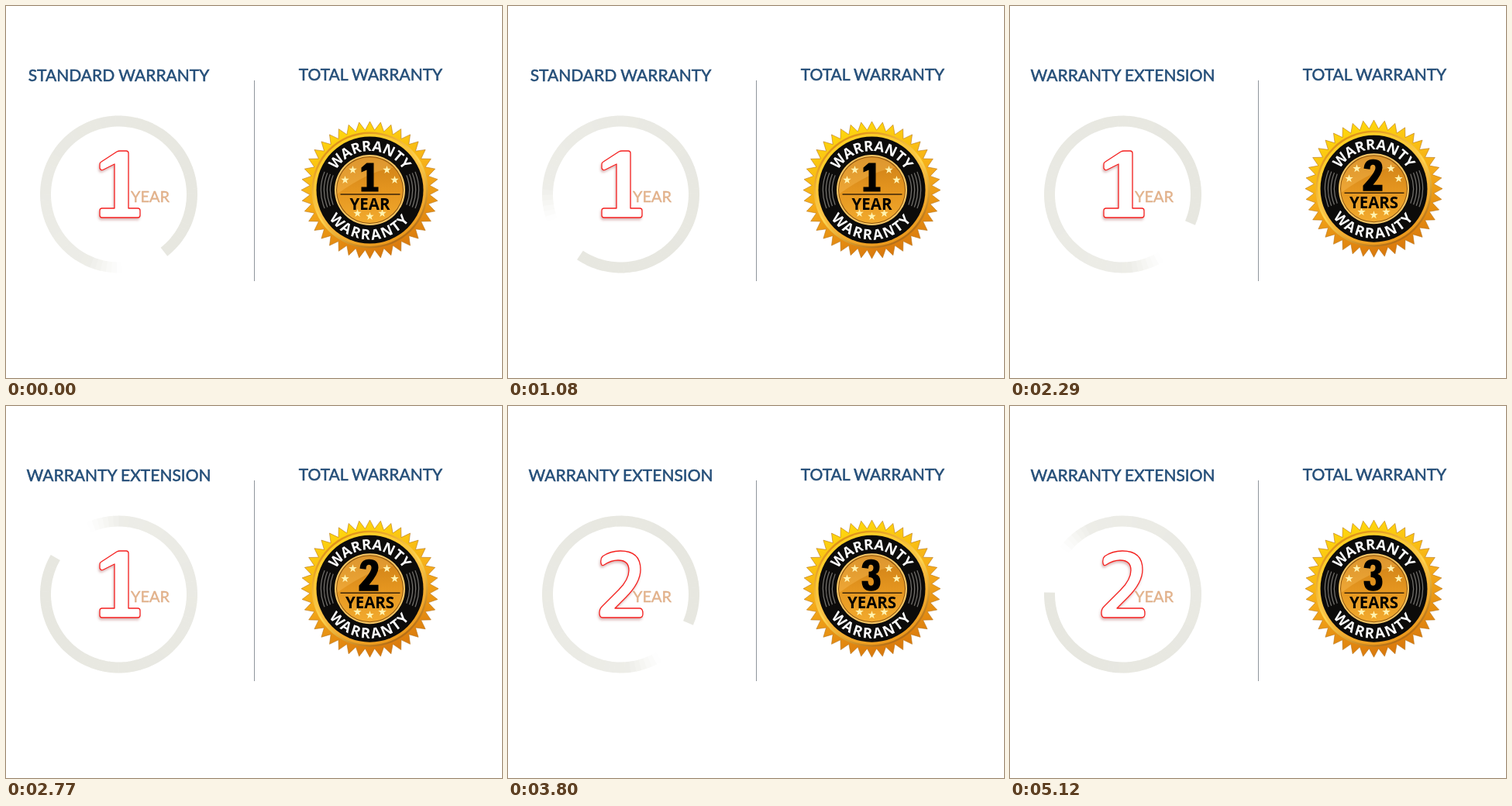
Animation, 640 px wide and 480 px high, one loop 5.18 s. Source, as an HTML page:

```html
<!DOCTYPE html>
<html lang="en">
<head>
<meta charset="utf-8">
<title>Warranty</title>
<style>
  html, body { margin: 0; width: 100%; height: 100%; overflow: hidden; background: #fff; }
  svg { display: block; width: 640px; height: 480px; }
  .heading { font: 400 21px Lato, sans-serif; fill: #24527f; stroke: #1d4168; stroke-width: .5; text-anchor: middle; }
  .unit { font: 400 20px Lato, sans-serif; fill: #e6b48c; stroke: #cf9c74; stroke-width: .3; }
  .digit { fill: #fff; stroke: #f5201f; stroke-width: 1.3; stroke-linejoin: round; filter: url(#shade); }
  .arc-text { font: 700 18.6px "Open Sans", sans-serif; fill: #fff; text-anchor: middle; }
  .years { font: 700 20.5px "Open Sans", sans-serif; text-anchor: middle; }
</style>
</head>
<body>
<svg viewBox="0 0 640 480">
  <defs>
    <filter id="shade" x="-20%" y="-20%" width="140%" height="140%">
      <feDropShadow dx="-1" dy="2.5" stdDeviation="1.5" flood-color="#a04a48" flood-opacity=".4"/>
    </filter>
    <linearGradient id="gold" x1=".3" y1="0" x2=".6" y2="1">
      <stop offset="0" stop-color="#ffdb0c"/>
      <stop offset=".5" stop-color="#f5ab1a"/>
      <stop offset="1" stop-color="#d8760c"/>
    </linearGradient>
    <linearGradient id="rim" x1=".2" y1="0" x2=".8" y2="1">
      <stop offset="0" stop-color="#d98710"/>
      <stop offset=".5" stop-color="#ffd650"/>
      <stop offset="1" stop-color="#a95c0c"/>
    </linearGradient>
    <linearGradient id="band" x1=".2" y1="0" x2=".7" y2="1">
      <stop offset="0" stop-color="#ffd21c"/>
      <stop offset=".5" stop-color="#fbc246"/>
      <stop offset="1" stop-color="#ea9518"/>
    </linearGradient>
    <linearGradient id="disc" x1="0" y1="0" x2="0" y2="1">
      <stop offset="0" stop-color="#cd7f16"/>
      <stop offset=".5" stop-color="#e4951f"/>
      <stop offset="1" stop-color="#f2aa2e"/>
    </linearGradient>
    <path id="upper" d="M-50.5 0A50.5 50.5 0 0 1 50.5 0"/>
    <path id="lower" d="M-64 0A64 64 0 0 0 64 0"/>
  </defs>

  <text id="title" class="heading" x="145.5" y="96.5"></text>
  <text class="heading" x="470.5" y="96">TOTAL WARRANTY</text>
  <path d="M320.5 96V355" stroke="#8f959c"/>

  <g id="ring" fill="none" stroke-width="14"></g>
  <path id="digit" class="digit"/>
  <text class="unit" x="161" y="253">YEAR</text>

  <g id="seal">
    <path id="spikes" fill="url(#gold)" stroke="#b8741a" stroke-width=".6"/>
    <circle r="75" fill="url(#rim)"/>
    <circle r="72.5" fill="url(#band)"/>
    <circle r="69" fill="#0c0b0a"/>
    <g id="grooves" fill="none" stroke="#777571" stroke-width="1.2"></g>
    <circle r="45.5" fill="#f7c765"/>
    <circle r="43.5" fill="#8f5710"/>
    <circle r="42.5" fill="url(#disc)"/>
    <path d="M-42 5A42 42 0 0 1 30 -29Q-2 -24 -42 5Z" fill="#ffc968" opacity=".3"/>
    <path id="stars" fill="#fff3b0"/>
    <path d="M-38 5.5H39" stroke="#3a2408" stroke-width="1.4"/>
    <path id="count"/>
    <text id="years" class="years" x="0" y="25.5"></text>
    <text class="arc-text"><textPath href="#upper" startOffset="50%">WARRANTY</textPath></text>
    <text class="arc-text" letter-spacing="2.2"><textPath href="#lower" startOffset="50%">WARRANTY</textPath></text>
  </g>
</svg>
<script>
const LOOP = 5180, STEP = 60, PAUSE = 70;
const TURN = 25;        // spinner positions per turn
const HEAD = 23;        // head angle at position 0, in degrees

const ONE = "M147 187H155Q158 187 158 190V261H170Q173 261 173 264V270Q173 273 170 273H124Q121 273 121 270V264Q121 261 124 261H140V204L126 211Q122 213 121 209V204Q121 202 123 201L143 188Q145 187 147 187Z";
const TWO = "M122 273H170Q174 273 174 268Q174 261 170 261H138L152 247Q171 228 171 211Q171 187 145 187Q132 187 122 194Q119 197 120 203Q121 207 124 205Q133 199 142 199Q156 199 156 212Q156 224 143 237L121 259Q118 262 118 267Q118 273 122 273Z";

// Bold numerals on the seal, around its centre
const SEAL_ONE = "M-4 -35H5V-4H11V2H-11V-4H-4V-26L-11 -23V-29Z";
const SEAL_TWO = "M-13 -26Q-12 -38 -1 -38Q11 -38 11 -27Q11 -19 -1 -5H11V3H-14V-4Q2 -21 2 -27Q2 -31 -1.5 -31Q-5 -31 -5 -25Z";
const SEAL_THREE = "M-13 -27Q-12 -38 -1 -38Q10 -38 10 -28Q10 -21 5 -19Q11 -17 11 -9Q11 3 -1 3Q-13 3 -13 -10H-5Q-5 -4 -1 -4Q2.5 -4 2.5 -9Q2.5 -15 -4 -15V-22Q2 -22 2 -27Q2 -31 -1.5 -31Q-4.5 -31 -4.5 -26Z";

const stages = [
  { start: 0, pause: 0, lead: 2.34, title: "STANDARD WARRANTY", digit: ONE, count: SEAL_ONE, years: "YEAR", y: 237.5 },
  { start: 1320, pause: PAUSE, lead: 0, title: "WARRANTY EXTENSION", digit: ONE, count: SEAL_TWO, years: "YEARS", y: 235.7 },
  { start: 2830, pause: PAUSE, lead: 0, title: "WARRANTY EXTENSION", digit: TWO, count: SEAL_THREE, years: "YEARS", y: 235.7 }
];

const el = id => document.getElementById(id);
const polar = (r, deg) => {
  const a = deg * Math.PI / 180;
  return [r * Math.cos(a), r * Math.sin(a)];
};
const point = (r, deg) => polar(r, deg).map(v => v.toFixed(2)).join(" ");
const arc = (r, from, to) => `M${point(r, from)}A${r} ${r} 0 0 1 ${point(r, to)}`;

function addPath(parent, d, stroke) {
  const path = document.createElementNS("http://www.w3.org/2000/svg", "path");
  path.setAttribute("d", d);
  if (stroke) path.setAttribute("stroke", stroke);
  parent.append(path);
}

function starburst(count, outer, inner, x = 0, y = 0) {
  const corners = Array.from({ length: count * 2 }, (_, i) => {
    const [dx, dy] = polar(i % 2 ? inner : outer, -90 + i * 180 / count);
    return `${(x + dx).toFixed(2)} ${(y + dy).toFixed(2)}`;
  });
  return `M${corners.join("L")}Z`;
}

// The tail stays nearly even, then falls off shortly before it meets the head.
function buildRing() {
  const segments = 90, size = 360 / segments;
  const mix = (c, f) => Math.round(c + (255 - c) * f);
  for (let i = segments - 1; i >= 0; i--) {
    const along = i / segments;
    const fade = .35 * along ** 2 + Math.max(0, (along - .82) / .1);
    const color = `rgb(${[231, 231, 224].map(c => mix(c, fade))})`;
    if (fade < 1) addPath(el("ring"), arc(94.5, -(i + 1) * size - .3, -i * size), color);
  }
}

function buildSeal() {
  el("spikes").setAttribute("d", starburst(40, 88.5, 77.5));
  for (const r of [51, 55, 59, 63]) {
    addPath(el("grooves"), arc(r, -22, 22));
    addPath(el("grooves"), arc(r, 158, 202));
  }
  const places = [[-22, -26], [22, -26], [-32, -13], [32, -13], [-16, 30], [0, 34], [16, 30]];
  el("stars").setAttribute("d", places.map(([x, y]) => starburst(5, 5.5, 2.2, x, y)).join(""));
}

let shown;
function showStage(stage) {
  if (stage === shown) return;
  shown = stage;
  el("title").textContent = stage.title;
  el("digit").setAttribute("d", stage.digit);
  el("count").setAttribute("d", stage.count);
  el("years").textContent = stage.years;
  el("seal").setAttribute("transform", `translate(469.5 ${stage.y})`);
}

function update(time) {
  const t = time % LOOP;
  const stage = stages.findLast(s => t >= s.start);
  const step = Math.floor(Math.max(0, t - stage.start - stage.pause) / STEP);
  const position = Math.floor(stage.lead + step * 5 / 3);
  showStage(stage);
  el("ring").setAttribute("transform",
    `translate(145.5 243) rotate(${HEAD + position % TURN * 360 / TURN})`);
}

buildRing();
buildSeal();
update(0);
const begin = performance.now();
(function tick() {
  update(performance.now() - begin);
  requestAnimationFrame(tick);
})();
</script>
</body>
</html>
```
